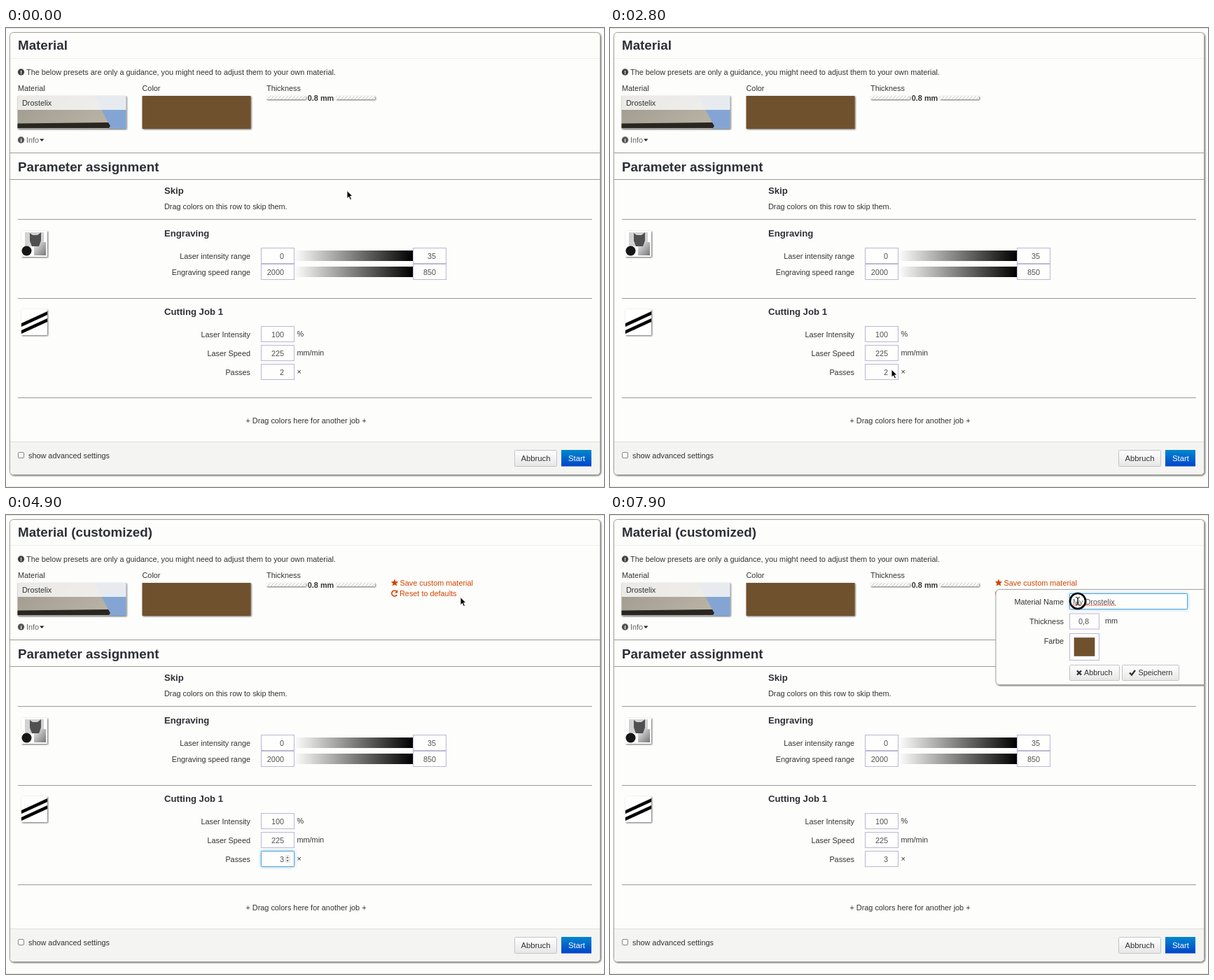
An HTML page for the animation above (8 s loop, 854 px wide and 656 px high).

```html
<!DOCTYPE html>
<html lang="en">
<head>
<meta charset="utf-8">
<style>
  html, body { margin: 0; width: 100%; height: 100%; overflow: hidden; background: #fdfdfb; }
  svg { display: block; width: 854px; height: 656px; }
  text { font: 10.87px "Liberation Sans", Arial, sans-serif; fill: #333; white-space: pre; }
  .b { font-weight: bold; }
  .h1 { font-size: 18.8px; font-weight: bold; fill: #2d2f36; }
  .h2 { font-size: 13.15px; font-weight: bold; fill: #2d2f36; }
  .field { fill: #505050; }
  .btn { font-size: 11.3px; }
  .link { fill: #d14400; }
  .soft { fill: #666; }
  .tip { font-size: 8.53px; fill: #999; }
  .status { font-size: 10px; fill: #999; }
  .end { text-anchor: end; }
  .mid { text-anchor: middle; }
</style>
</head>
<body>
<svg id="stage" viewBox="0 0 854 656">
  <defs>
    <linearGradient id="ramp"><stop stop-color="#fdfdfb"/><stop offset="1"/></linearGradient>
    <linearGradient id="grey" x2="0" y2="1"><stop stop-color="#fff"/><stop offset="1" stop-color="#e6e6e6"/></linearGradient>
    <linearGradient id="blue" x2="0" y2="1"><stop stop-color="#0088cc"/><stop offset="1" stop-color="#0044cc"/></linearGradient>
    <linearGradient id="shade" x2="1" y2="1"><stop stop-color="#eee"/><stop offset="1" stop-color="#777"/></linearGradient>
    <linearGradient id="board" x2="1" y2=".4"><stop stop-color="#9f9a8e"/><stop offset="1" stop-color="#b9b4a6"/></linearGradient>
    <pattern id="hatch" width="5" height="5" patternUnits="userSpaceOnUse">
      <path d="M-1 6L6-1" stroke="#c4c1b4"/>
    </pattern>
    <filter id="shadow" x="-20%" y="-20%" width="140%" height="150%">
      <feDropShadow dx="1" dy="1" stdDeviation="1.3" flood-opacity=".6"/>
    </filter>
    <filter id="glow" x="-20%" y="-40%" width="140%" height="180%">
      <feDropShadow dx="0" dy="0" stdDeviation="2" flood-color="#52a8ec" flood-opacity=".7"/>
    </filter>
    <clipPath id="dialog"><path d="M0 0H848V656H0z"/></clipPath>
  </defs>
</svg>
<script>
const stage = document.getElementById('stage');
const MATERIAL = 'Drostelix';

const text = (x, y, s, cls = '', id = '') => `<text x="${x}" y="${y}" class="${cls}" id="${id}">${s}</text>`;
const rect = (x, y, w, h, fill, extra = '') =>
  `<rect x="${x}" y="${y}" width="${w}" height="${h}" fill="${fill}" ${extra}/>`;
const path = (d, fill, extra = '') => `<path d="${d}" fill="${fill}" ${extra}/>`;
const line = (x1, x2, y, color = '#9a9a9a') => path(`M${x1} ${y}H${x2}`, 'none', `stroke="${color}"`);
const group = (id, body, extra = '') => `<g id="${id}" ${extra}>${body}</g>`;
const box = (x, y, w, h) => rect(x + .5, y + .5, w - 1, h - 1, '#fefefd', 'stroke="#bbb8d2"');
const focusBox = (x, y, w, h) =>
  rect(x + .5, y + .5, w - 1, h - 1, '#fefefd', 'stroke="#52a8d8" rx="1" filter="url(#glow)"');
const field = (x, y, value, w = 48) =>
  box(x, y, w, 23) + text(x + w - 15, y + 15.5, value, 'field end');
const button = (x, y, w, h, label) =>
  rect(x + .5, y + .5, w - 1, h - 1, 'url(#grey)', 'stroke="#c4c4c4" rx="1"') +
  text(x + w / 2, y + h / 2 + 4, label, 'btn mid');
const badge = (y, mark, color) =>
  `<circle cx="21.5" cy="${y}" r="4.7" fill="${color}"/>` +
  `<text x="21.5" y="${y + 3}" class="b mid" style="font-size:8px;fill:#fff">${mark}</text>`;
const card = y => rect(22, y, 37, 37, '#fff', 'filter="url(#shadow)"');

const dialog =
  line(0, 854, .5, '#e4e4e0') + line(0, 854, 655.5, '#e8e8e4') +
  rect(5.5, 6.5, 843, 632, '#fdfdfb', 'rx="5" stroke="#a5a59d" filter="url(#shadow)"') +
  path('M6 591H848V633Q848 638 843 638H11Q6 638 6 633z', '#f4f4f2') + line(6, 848, 591.5, '#dededb') +
  text(17, 31, 'Material', 'h1', 'title') + line(6, 848, 43.5, '#eeeeea') +
  line(6, 848, 178.5) + text(17, 205, 'Parameter assignment', 'h1') + line(6, 848, 216.5) +
  [273.5, 386.5, 528.5].map(y => line(17, 837, y)).join('');

const presets =
  badge(63, '!', '#444') +
  text(29, 66.5, 'The below presets are only a guidance, you might need to adjust them to your own material.') +
  text(17, 90, 'Material') + text(194.5, 90, 'Color') + text(372, 90, 'Thickness') +
  rect(16.5, 97, 155, 47, 'url(#board)', 'filter="url(#shadow)"') +
  path('M126 97H171.5V144H147V137z', '#84a5d3') +
  path('M16.5 136.5L146 135L149 140L147 143H16.5z', '#292621') +
  rect(16.5, 97, 155, 20, '#f8f8f6', 'opacity=".85"') + text(23, 111, MATERIAL) +
  rect(194.5, 97, 155, 47, '#70512d', 'filter="url(#shadow)"') +
  [372, 471].map(x => rect(x, 97.5, 56, 4.5, '#fdfdfb', 'filter="url(#shadow)"') +
    rect(x, 97.5, 56, 4.5, 'url(#hatch)')).join('') +
  text(449.5, 103.5, '0.8 mm', 'b mid') +
  badge(160, 'i', '#555') + text(29, 164, 'Info', 'soft') + path('M48 158.5H54.5L51.2 162z', '#222');

const thumbnails =
  card(290) +
  rect(27, 292, 27, 20, '#d2d2d2') + rect(40, 306, 17, 19, 'url(#shade)') +
  path('M34 293L38 296H45L50 292V304L47 312H37L34 304z', '#505050') +
  '<circle cx="29.5" cy="318.5" r="7" fill="#161616"/>' +
  card(402) + path('M22 422L59 405V410L22 427zM22 432L59 415V420L22 437z', '#000');

const jobs =
  text(226, 237, 'Skip', 'h2') + text(226, 259, 'Drag colors on this row to skip them.') +
  text(226, 297.5, 'Engraving', 'h2') +
  [[315, 'Laser intensity range', 0, 35], [338, 'Engraving speed range', 2000, 850]].map(([y, label, from, to]) =>
    text(349, y + 15, label, 'end') + rect(412, y + 3, 169, 15, 'url(#ramp)') +
    field(364, y - 1, from) + field(581, y - 1, to)).join('') +
  text(226, 410, 'Cutting Job 1', 'h2') +
  [[426, 'Laser Intensity', 100, '%'], [453, 'Laser Speed', 225, 'mm/min']].map(([y, label, value, unit]) =>
    text(349, y + 15.5, label, 'end') + field(364, y, value) + text(415.5, y + 15, unit)).join('') +
  text(349, 495.5, 'Passes', 'end') + box(364, 480, 48, 23) +
  group('passFocus', focusBox(364, 480, 48, 23)) +
  text(397, 495.5, '2', 'field end', 'passes') + text(415.5, 495, '×') +
  group('spinner', rect(398.5, 486.5, 7, 10, '#f8f8f8', 'stroke="#ddd" rx="2"') +
    path('M400 490.5L402 488L404 490.5zM400 493L402 495.5L404 493z', '#666')) +
  text(428.5, 564.5, '+ Drag colors here for another job +', 'mid');

const footer =
  rect(17.5, 606.5, 8, 8, '#fff', 'stroke="#888" rx="1.5"') + text(32, 614.5, 'show advanced settings') +
  button(726, 603, 61, 24, 'Abbruch') +
  rect(793, 603, 43, 23.5, 'url(#blue)') +
  `<text x="815" y="619" class="btn mid" style="fill:#fff">Start</text>`;

const tooltip = group('tooltip',
  rect(462.5, 473, 381, 37, '#fefefd', 'stroke="#f2a580" stroke-width="1.5" rx="3"') +
  path('M458.5 491.5L463 487.5V495.5z', '#f2a580') +
  text(470, 486.5, 'Indicates the number of times the laser will run over the design to cut it. Increase the number of', 'tip') +
  text(470, 502, 'passes if the material does not get cut.', 'tip'));

const links = group('links',
  path('M555 91.5L556.5 95L560.2 95.3L557.4 97.8L558.3 101.5L555 99.5L551.7 101.5L552.6 97.8L549.8 95.3L553.5 95z', '#d14400') +
  text(562.5, 101, 'Save custom material', 'link') +
  path('M558 109.5A4 4 0 1 0 558.3 114', 'none', 'stroke="#d14400" stroke-width="1.6"') +
  path('M559.3 107V111.4H555z', '#d14400') +
  text(562, 116, 'Reset to defaults', 'link'));

const popup = group('popup',
  rect(551, 106.5, 310, 136, '#fdfdfb', 'rx="5" stroke="#aaa" filter="url(#shadow)"') +
  text(648, 127.5, 'Material Name', 'end') + box(656, 112, 169, 23) +
  group('nameFocus', focusBox(656, 112, 169, 23) +
    path('M661 129H722', 'none', 'stroke="#e33" stroke-width="1.3" stroke-dasharray="1.3 1.3"')) +
  text(661, 127.5, 'My ' + MATERIAL, 'field') +
  text(648, 155.5, 'Thickness', 'end') + field(656, 140.5, '0,8', 43) + text(707, 155, 'mm') +
  text(648, 184, 'Farbe', 'end') + box(656, 169, 43, 39) +
  rect(663, 175.5, 29, 26, '#70512d', 'stroke="#5f4a35" stroke-width=".6"') +
  button(656, 214, 72, 23, '') + path('M667 222.5L673 228.5M673 222.5L667 228.5', 'none', 'stroke="#333" stroke-width="2.4"') +
  text(677, 229, 'Abbruch') +
  button(731, 214, 82, 23, '') + path('M742 225.5L745 228.5L750 222', 'none', 'stroke="#333" stroke-width="2.4"') +
  text(754.5, 229, 'Speichern'), 'clip-path="url(#dialog)"');

const statusBar = group('status',
  path('M0 0H274Q277 0 277 3V16H0z', '#2b2b2e') + text(-3, 10, 'beam-demo.local/#', 'status'));

const pointer = group('cursor',
  group('ring', '<circle r="11" fill="#fff" fill-opacity=".15" stroke="#000" stroke-width="2.6"/>') +
  group('arrow', path('M0 0V11.2L2.6 8.8L4.5 13L6.5 12.1L4.6 8H8z', '#000', 'stroke="#fff" stroke-width=".9"')) +
  group('ibeam', path('M-3-5.5Q0-5.5 0-3.5Q0-5.5 3-5.5M0-4V4M-3 5.5Q0 5.5 0 3.5Q0 5.5 3 5.5M-1.5 2H1.5', 'none',
    'stroke="#111"')));

stage.insertAdjacentHTML('beforeend',
  dialog + presets + thumbnails + jobs + footer + tooltip + links + popup + statusBar + pointer);

// Pointer stops: time, x, y
const stops = [
  [400, 487, 232.5], [1300, 383, 496], [1900, 383, 496], [2500, 402, 488], [3400, 402, 488], [3800, 444, 480],
  [4100, 470, 445], [4900, 649, 117.5], [5300, 640, 99], [6300, 640, 99], [6800, 653, 107], [7500, 668, 123], [8000, 668, 123]
];
const ease = k => k * k * (3 - 2 * k);
function pointerAt(t) {
  const i = stops.findIndex(s => s[0] >= t);
  if (i < 1) return stops[0].slice(1);
  const [a, b] = [stops[i - 1], stops[i]];
  const k = ease((t - a[0]) / (b[0] - a[0]));
  return [a[1] + (b[1] - a[1]) * k, a[2] + (b[2] - a[2]) * k];
}

const el = id => document.getElementById(id);
const show = (id, visible) => el(id).style.display = visible ? '' : 'none';
const move = (id, x, y) => el(id).setAttribute('transform', `translate(${x} ${y})`);

function render(now) {
  const t = Math.floor(now % 8000 / 100) * 100;
  const during = (from, to = 8000) => t >= from && t < to;
  const [x, y] = pointerAt(t);
  const overText = during(1200, 2300) || during(7300);

  move('cursor', x, y);
  show('arrow', !overText);
  show('ibeam', overText);
  show('ring', during(3100, 3400) || during(5800, 6100) || during(7700));
  show('tooltip', during(1300, 2400));
  show('spinner', during(1200, 2400) || during(3200, 6000));
  show('passFocus', during(3200, 6000));
  show('links', during(3200));
  show('popup', during(6000));
  show('nameFocus', during(7700));
  show('status', during(5200, 6900));
  move('status', 0, during(6800) ? 649 : 641);
  el('title').textContent = during(3200) ? 'Material (customized)' : 'Material';
  el('passes').textContent = during(3200) ? '3' : '2';
  requestAnimationFrame(() => render(performance.now()));
}
render(0);
</script>
</body>
</html>
```
